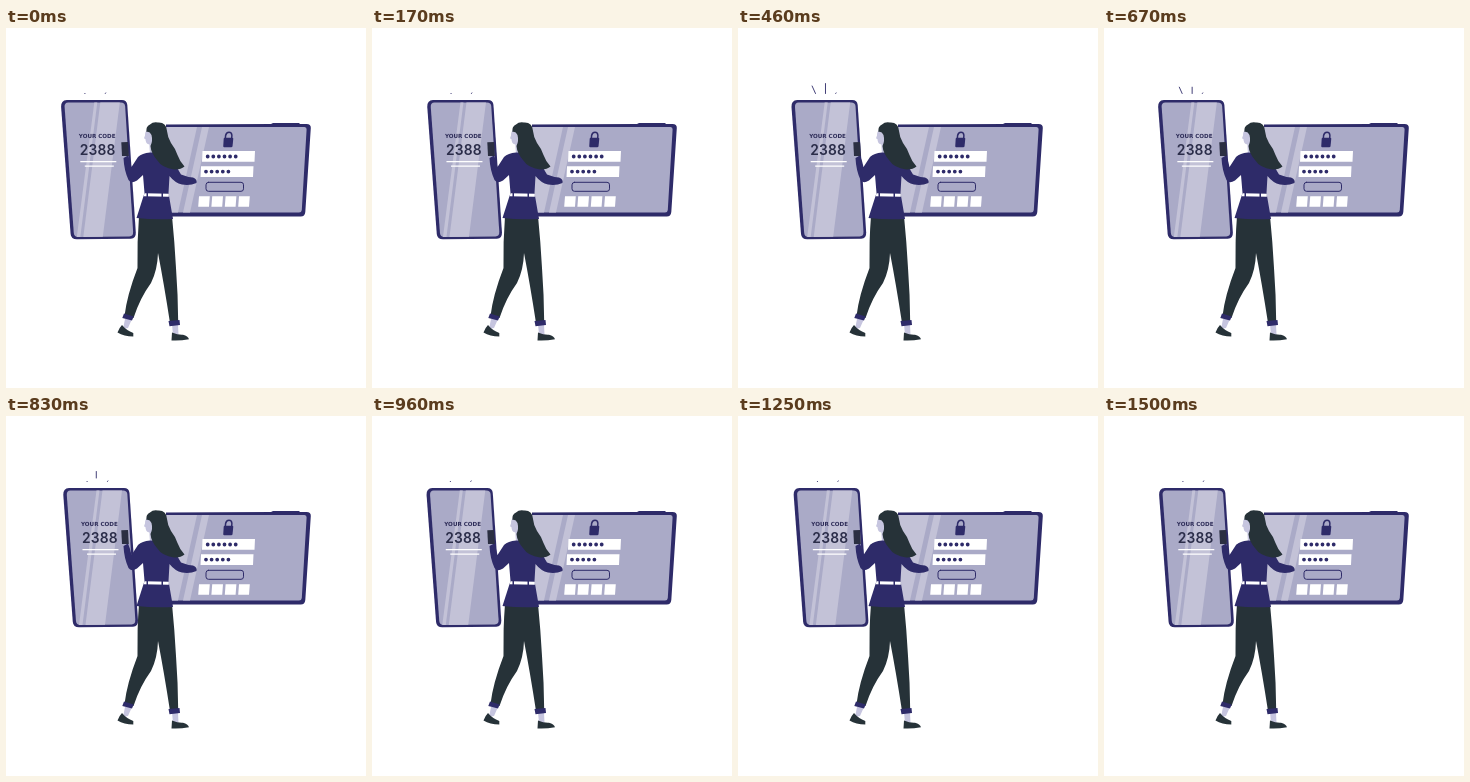
An HTML page for the animation above (1540 ms loop, 360 px wide and 360 px high).

```html
<!DOCTYPE html>
<html lang="en">
<head>
<meta charset="utf-8">
<title>Verification code</title>
<style>
  html, body { margin: 0; height: 100%; overflow: hidden; background: #fff; }
  svg { display: block; width: 100vw; height: 100vh; }
  .navy { fill: #2e2b69; }
  .dark { fill: #263238; }
  .skin { fill: #c6c5df; }
  .screen { fill: #aaaac7; }
  .shine { fill: #c3c2d7; }
  .white { fill: #fff; }
  .line { fill: none; stroke: #2e2b69; stroke-linejoin: round; stroke-linecap: round; }
  .dots { fill: none; stroke: #2e2b69; stroke-width: 3.8; stroke-linecap: round; stroke-dasharray: 0 5.6; }
  .label { font: bold 5.6px "DejaVu Sans", sans-serif; fill: #2d2c58; }
  .code { font: 600 13.8px Inter, sans-serif; letter-spacing: .2px; fill: #2b2d49; }
</style>
</head>
<body>
<svg viewBox="0 0 360 360">
  <g id="phone">
    <path class="navy" d="M61 72H116Q121 72 121.500 77L130 204.500Q130.300 210.500 125 210.700L71 211.300Q65.300 211.300 64.800 206L55.300 79Q55 72.300 61 72Z"/>
    <path class="screen" d="M62.500 74.500H115Q119 74.500 119.300 78L127.300 203.500Q127.600 208.300 123.500 208.500L72.500 209Q68.300 209 68 205L58.800 79Q58.500 74.500 62.500 74.500Z"/>
    <path class="shine" d="M88.500 74.500H91.500L74.500 209H71ZM94.500 74.500H114L97 208.700L77.500 209Z"/>
    <text class="label" x="73" y="109.900">YOUR CODE</text>
    <text class="code" x="74" y="126.800">2388</text>
    <path d="M74.500 133.700H110.500M79 138.200H108" stroke="#fff" stroke-width="1.200"/>
    <path id="buzz" class="line" stroke-width=".9"/>
  </g>

  <g id="monitor">
    <path class="navy" d="M160 96.500L265 96L267 95H293L294 96H300.500Q305 96 304.800 100L299.300 184Q298.800 188.500 294.800 188.500H160Z"/>
    <path class="screen" d="M160 99H298.500Q300.800 99 300.600 101.500L295.800 182Q295.600 184.500 293 184.500H160Z"/>
    <path class="shine" d="M160 99H191L172 184.500H160ZM196 99H203L184 184.500H177Z"/>
    <path class="line" stroke-width="1.500" d="M219.300 111L219.600 107.500Q220.200 104.300 223 104.300T225.900 107.500L225.600 111"/>
    <path class="navy" d="M218.500 109.800H226.500L227.300 110.600L226.500 118.500L225.500 119.300H218L217.200 118.500L217.700 110.600Z"/>
    <path class="white" d="M196.500 123H249L248.500 133.700H196ZM195 138.300H247.500L247 149H194.500ZM193 168.300H203.800L203 178.800H192.200ZM206.200 168.300H217L216.200 178.800H205.400ZM219.600 168.300H230.400L229.600 178.800H218.800ZM233 168.300H243.800L243 178.800H232.200Z"/>
    <path class="dots" d="M201.700 128.500H230M200 143.600H223"/>
    <rect class="line" x="200" y="154.300" width="37.500" height="9" rx="2.500" stroke-width="1"/>
  </g>

  <g id="woman">
    <path class="skin" d="M119 291L126 291L122 300L117 301ZM166 296H172L172.500 307H167Z"/>
    <path class="dark" d="M116 297Q120.500 302.500 127.300 305V308.600Q118 308.500 111.500 304.500Q113 300 116 297ZM166 304.500Q172 307 177 306.700Q182 308 183 311.300Q174 313 165.500 312.500Z"/>
    <path class="dark" d="M133 188H166Q168.500 213 170 240Q172 267 172.200 294L164 295Q158 256 152 225Q151.500 242 145 255Q134 270 127.500 290L118.500 288Q121 267 131.500 240Q131 214 133 188Z"/>
    <path class="navy" d="M118 285.500L127.700 288.500L126 292.500L116.300 290ZM162.500 293L173.500 292L174 297L163.500 298.300Z"/>
    <path class="skin" d="M143 110H156V127H144Z"/>
    <path class="navy" d="M144 124.500L158 125Q167 128 170 138L175 146.500Q181 149 187 149.500Q191.500 151 190.500 155Q184 157.800 176 156.500Q169 155 163.500 148L162.500 165L167 191Q148 192 130.500 190L138.500 165L137 147L131 152.500Q125 156 122.500 152Q118 142 117.500 130L122 127.500Q124 132 125.500 139L132 129Q136 125 144 124.500Z"/>
    <path class="white" d="M138.500 165.300L162.800 165.800V168.700L137.600 168.200Z"/>
    <path class="navy" d="M140.500 164.500H142V169H140.500ZM155.500 164.500H157V169H155.500Z"/>
    <path d="M115.300 114.300L122 114L122.800 128H116Z" fill="#2b2f42"/>
    <path class="skin" d="M140.500 102Q138.700 105 139 107.500L138 110.300L139.500 111.300Q139.500 116 143.500 116.500L149 113V102Z"/>
    <path class="dark" d="M140.500 104Q139.500 98.500 144 96.500Q147 93.500 152 94.500Q160 94 160.800 102Q161.500 109 165 115Q169 120 171.500 127Q174 134 178.500 138.500Q174.500 142 168 141.500Q156 140 151 132Q145 125 144.500 118Q147 113 145.500 107Q143.500 103 140.500 104Z"/>
  </g>
</svg>
<script>
  const phone = document.getElementById("phone");
  const buzz = document.getElementById("buzz");

  const LOOP = 1540, STEP = 1000 / 24, PERIOD = 1500, LEAD = 31, SCALE = 0.95;
  // Shake offsets at every tenth of the period
  const KEYS = [0, -1, 2, -4, 4, -4, 4, -4, 2, -1, 0];

  function shakeAt(ms) {
    const pos = (ms % PERIOD) / PERIOD * 10;
    const i = Math.floor(pos);
    return SCALE * (KEYS[i] + (KEYS[i + 1] - KEYS[i]) * (pos - i));
  }

  // Short strokes above the phone grow with the swing
  function buzzPath(dx) {
    const tall = Math.min(10, Math.abs(dx) * 5.5);
    const right = "M99.500 65.500l.4-.6";
    if (dx < -0.8) {
      const side = Math.min(7.5, tall);
      return `M79.300 65.500l${-side * 0.45} ${-side}M89.300 65.500v${-tall}${right}`;
    }
    const centre = dx > 1.3 ? `M88.300 62v${-Math.min(6.5, tall)}` : "";
    return `M79 65.500h.2${right}${centre}`;
  }

  function draw(now) {
    const step = Math.floor((now % LOOP + 5) / STEP);
    const dx = shakeAt(step * STEP + LEAD);
    phone.setAttribute("transform", `translate(${dx.toFixed(2)} 0)`);
    buzz.setAttribute("d", buzzPath(dx));
    requestAnimationFrame(draw);
  }
  requestAnimationFrame(draw);
</script>
</body>
</html>
```
